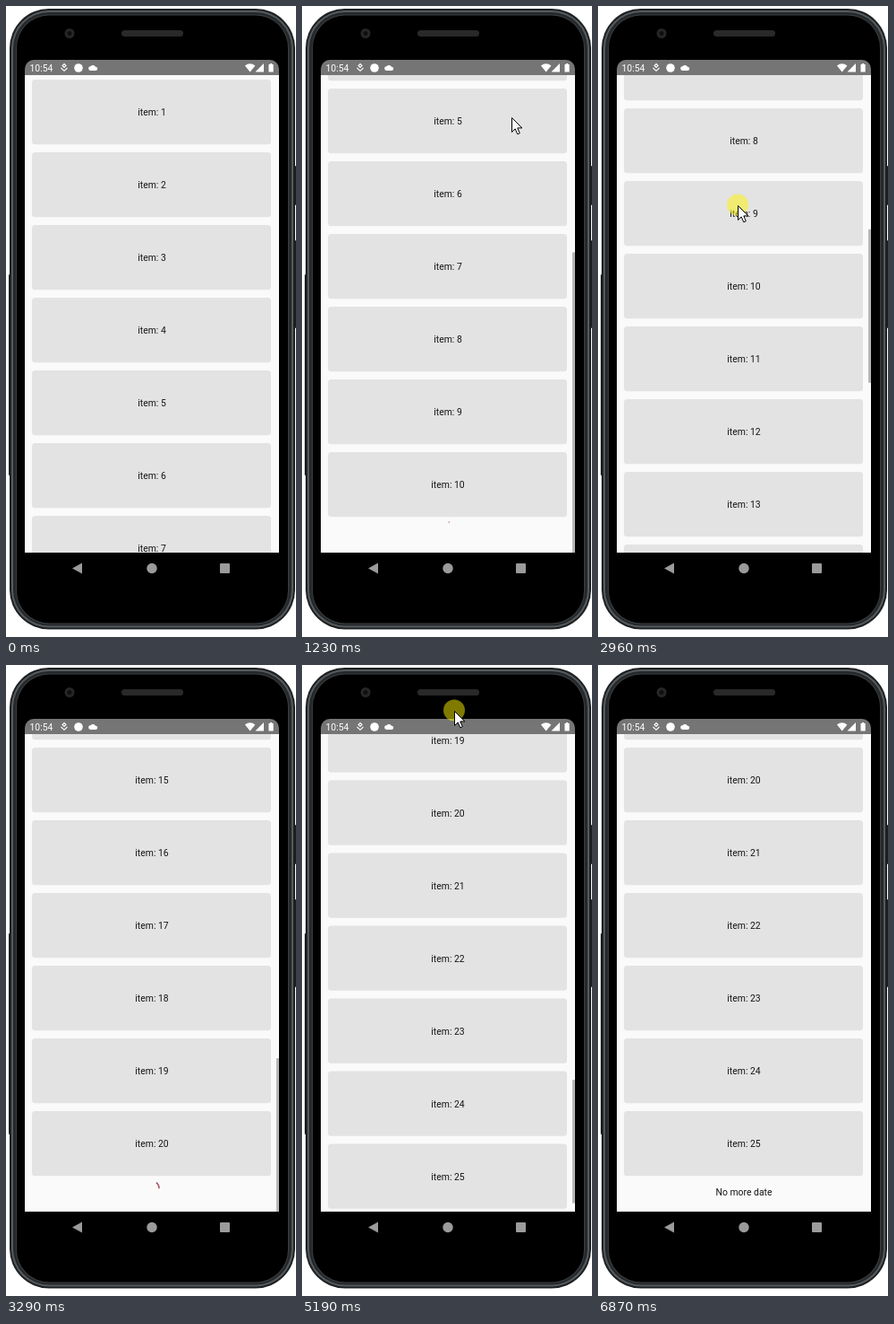
Animation of 324 by 703 pixels, one loop 7.25 s. Source, as an HTML page with a canvas:

```html
<!DOCTYPE html>
<html lang="en">
<head>
<meta charset="utf-8">
<title>Endless list</title>
<style>
html, body { margin: 0; width: 100%; height: 100%; overflow: hidden; background: #fff; }
canvas { display: block; width: 324px; height: 703px; }
</style>
</head>
<body>
<canvas id="stage"></canvas>
<script>
const canvas = document.getElementById('stage');
const ctx = canvas.getContext('2d');
const ratio = window.devicePixelRatio || 1;
canvas.width = 324 * ratio;
canvas.height = 703 * ratio;

const LOOP = 7250, PITCH = 81, TOP = 77, VIEW = 532;
const FONT = '10.4px Roboto, sans-serif';

// Keyframes: [time, value] and [time, x, y]
const scrollKeys = [
  [980, 0], [1040, 36], [1090, 150], [1140, 314],
  [2500, 314], [2600, 327], [2800, 417], [2960, 535], [3060, 735], [3165, 1124],
  [4740, 1124], [4900, 1180], [5050, 1305], [5190, 1492.5], [5230, 1529]
];
const cursorKeys = [
  [260, 289, 700], [600, 240, 610], [940, 204, 542], [1000, 205, 530], [1080, 218, 370],
  [1160, 229, 200], [1230, 234, 124], [1320, 236, 112], [1520, 220, 260], [1710, 196, 425],
  [2000, 166, 470], [2440, 160, 449], [2600, 159, 430], [2800, 158, 340], [2960, 156, 222],
  [3040, 155, 70], [3100, 154, 12], [3185, 154, 10],
  [3560, 164, 10], [3760, 168, 160], [3940, 172, 337], [4300, 178, 450], [4580, 180, 470],
  [4700, 179, 437], [4900, 176, 370], [5050, 173, 240], [5190, 170, 51], [5235, 169, 0],
  [5620, 164, 7], [5950, 127, 300], [6340, 145, 546], [6600, 210, 625], [6850, 288, 703]
];
const shown = [[260, 3185], [3560, 5235], [5620, 6850]];
const presses = [[950, 1130], [2440, 3090], [4680, 5235]];
const scrolls = [[980, 1140], [2500, 3165], [4740, 5230]];
const loads = [[1205, 2230], [3115, 4150]];

const clamp = v => Math.max(0, Math.min(1, v));
const smooth = v => (v = clamp(v), v * v * (3 - 2 * v));
const within = (t, spans) => spans.find(([a, b]) => t >= a && t < b);

function sample(keys, t) {
  const i = keys.findIndex(k => k[0] > t);
  if (i === 0) return keys[0].slice(1);
  if (i < 0) return keys[keys.length - 1].slice(1);
  const a = keys[i - 1], b = keys[i], p = (t - a[0]) / (b[0] - a[0]);
  return a.slice(1).map((v, j) => v + (b[j + 1] - v) * p);
}

function box(x, y, w, h, r, color) {
  ctx.fillStyle = color;
  ctx.beginPath();
  ctx.roundRect(x, y, w, h, r);
  ctx.fill();
}

function disc(x, y, r, color) {
  ctx.fillStyle = color;
  ctx.beginPath();
  ctx.arc(x, y, r, 0, 7);
  ctx.fill();
}

function shape(path, color) {
  ctx.fillStyle = color;
  ctx.fill(new Path2D(path));
}

function label(text, x, y, color = '#151515', align = 'center') {
  ctx.font = FONT;
  ctx.textAlign = align;
  ctx.fillStyle = color;
  ctx.fillText(text, x, y + 3.7);
}

function drawPhone() {
  box(321, 178, 3, 44, 1, '#1b1d1e');
  box(321, 261, 3, 98, 1, '#1b1d1e');
  box(3, 299, 3, 224, 1, '#1b1d1e');
  box(4, 3, 319, 691.5, 44, '#1d2022');
  box(6, 5, 315, 687.5, 42, '#555a5d');
  box(8, 7, 311, 683.5, 40, '#25282a');
  box(11, 9.5, 305, 679, 37, '#3b3f41');
  box(12, 10.5, 303, 677, 36, '#000');
  box(129, 27, 69, 7, 3.5, '#292929');
  disc(71, 30.5, 5.5, '#262626');
  disc(71, 30.5, 2.5, '#0e0e10');
  shape('M74 626.5L85 620.5V632.5Z', '#9b9b9b');
  disc(163, 626.5, 5.7, '#9b9b9b');
  box(239, 621, 11, 11, 1, '#9b9b9b');
}

function drawStatusBar() {
  box(21, 60, 284, 17, [10, 10, 0, 0], '#757575');
  label('10:54', 26.5, 69, '#fff', 'left');
  ctx.strokeStyle = '#fff';
  ctx.lineWidth = 1.1;
  ctx.stroke(new Path2D('M65 64.5L67 66.5L65 68.5L63 66.5ZM61.5 69L65 72.3L68.5 69'));
  disc(81, 69, 4.8, '#fff');
  shape('M94.5 72a2.4 2.4 0 0 1 0-4.8a3.2 3.2 0 0 1 5.5 .6a2.1 2.1 0 0 1 .3 4.2Z', '#fff');
  shape('M267 66.5Q272.7 62 278.4 66.5L272.7 73.5Z', '#fff');
  shape('M288 64V73.5H278.5Z', '#fff');
  shape('M293.5 65h1.5v-1h2.2v1h1.5v8.5h-5.2Z', '#fff');
}

function drawSpinner(y, elapsed) {
  const p = elapsed / 1332 % 1;
  const turn = 286 * elapsed / 1332 - 90;
  const head = turn + 290 * smooth(p * 2) + 5;
  const tail = turn + 290 * smooth(p * 2 - 1);
  ctx.strokeStyle = '#a8525f';
  ctx.lineWidth = 1.6;
  ctx.beginPath();
  ctx.arc(163, y, 8, tail * Math.PI / 180, head * Math.PI / 180);
  ctx.stroke();
}

function drawList(t) {
  const count = t < loads[0][1] ? 10 : t < loads[1][1] ? 20 : 25;
  const [scroll] = sample(scrollKeys, t);
  ctx.save();
  ctx.beginPath();
  ctx.rect(21, TOP, 284, VIEW);
  ctx.clip();
  ctx.fillStyle = '#fafafa';
  ctx.fillRect(21, TOP, 284, VIEW);

  const first = Math.floor(scroll / PITCH);
  for (let i = first; i < Math.min(count, first + 8); i++) {
    const y = 82 + i * PITCH - scroll;
    box(29, y, 267, 72.3, 3.5, '#e3e3e3');
    label('item: ' + (i + 1), 163, y + 36.3);
  }

  const footer = 82 + count * PITCH - scroll;
  const load = within(t, loads);
  if (load) drawSpinner(footer + 5, t - load[0]);
  if (count === 25) label('No more date', 163, footer + 9.3);

  // The bar stays a moment after scrolling, then fades
  const run = scrolls.find(([a, b]) => t >= a && t < b + 570);
  if (run) {
    const scale = VIEW / (count * PITCH + 36);
    const alpha = 0.28 * (1 - clamp((t - run[1] - 370) / 200));
    ctx.fillStyle = `rgba(0,0,0,${alpha})`;
    ctx.fillRect(302, TOP + scroll * scale, 3, VIEW * scale);
  }
  ctx.restore();
}

function drawCursor(t) {
  if (!within(t, shown)) return;
  const [x, y] = sample(cursorKeys, t);
  if (within(t, presses)) disc(x, y - 0.5, 12, 'rgba(255,244,0,.5)');
  ctx.save();
  ctx.translate(x + 0.5, y + 0.5);
  const arrow = new Path2D('M0 0V16L3.7 12.4L6.3 18.3L8.8 17.2L6.3 11.4H11.4Z');
  ctx.fillStyle = '#fff';
  ctx.fill(arrow);
  ctx.strokeStyle = '#000';
  ctx.lineWidth = 1;
  ctx.stroke(arrow);
  ctx.restore();
}

function render(now) {
  const t = now % LOOP;
  ctx.setTransform(ratio, 0, 0, ratio, 0, 0);
  ctx.fillStyle = '#fff';
  ctx.fillRect(0, 0, 324, 703);
  drawPhone();
  drawList(t);
  drawStatusBar();
  drawCursor(t);
}

let start;
function tick(now) {
  start ??= now;
  render(now - start);
  requestAnimationFrame(tick);
}
render(0);
requestAnimationFrame(tick);
</script>
</body>
</html>
```
